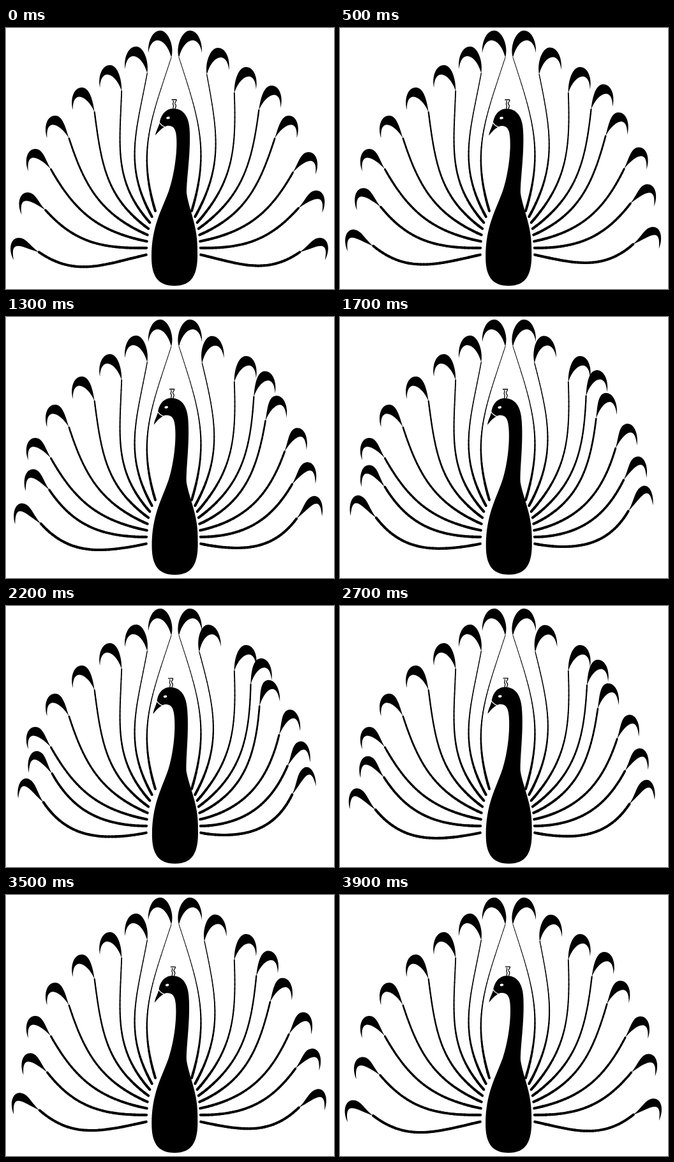
These frames come from a looping animation (514 by 408 pixels, 4 s). An HTML page with a canvas:

```html
<!DOCTYPE html>
<html lang="en">
<head>
<meta charset="utf-8">
<title>Peacock</title>
<style>
  html, body { margin: 0; width: 100%; height: 100%; overflow: hidden; background: #fff; }
  canvas { display: block; }
</style>
</head>
<body>
<canvas id="stage" width="514" height="408"></canvas>
<script>
const ctx = document.getElementById('stage').getContext('2d');
const LOOP = 4000, STEP = 100, RAD = Math.PI / 180;

// Top of each plume and its full swing in degrees; the right fan is drawn mirrored
const leftFan = [[242, 4], [204, 29], [163, 58], [119, 93], [77, 137], [46, 189], [34, 257, 9.6], [20, 328, 17]];
const rightFan = [[237, 4], [193, 31, 3.4], [149, 61], [109, 90, 4.4], [82, 137, 9.8], [51, 194, 11.7], [39, 254, 14.2], [33, 328, 24]];

const body = `M262,126 C278,126 288,138 288,165 C289,200 283,235 283,258
  C287,286 301,309 300,350 C301,385 292,403 264,403 C236,403 228,385 228,358
  C228,310 244,285 255,255 C263,232 269,195 267,170 C266,156 261,152 252,153
  C244,156 239,162 234,168 C235,160 240,154 241,146 C244,133 252,126 262,126Z`;
const crest = `M260,112 L267,112 C268,115 263,116 265,119 C268,121 266,123 265,126
  M262,114 C264,116 260,118 262,120 C264,122 261,124 262,126`;
const beakLine = 'M239,145 C241,150 244,153 250,155';

// The neck leans left, more towards the head
function lean(path, sway) {
  return new Path2D(path.replace(/(\d+),(\d+)/g, (_, x, y) => {
    const k = sway * Math.max(-0.2, (270 - y) / 130);
    return `${+x - 4.5 * k},${+y + k}`;
  }));
}

// i counts from the upright feather down to the lowest one
function feather([ax, ay, swing = 0], i, sway) {
  const root = [219 + 15 * 0.65 ** i, 286 + 8.8 * i + 0.14 * i * i];
  const reach = Math.hypot(ax - root[0], ay - root[1]);

  // Bend about the root, more towards the plume
  const bend = ([x, y]) => {
    const dx = x - root[0], dy = y - root[1];
    const a = swing * RAD * sway * (Math.hypot(dx, dy) / reach) ** 0.65;
    const c = Math.cos(a), s = Math.sin(a);
    return [root[0] + dx * c - dy * s, root[1] + dx * s + dy * c];
  };
  const near = (x, y) => [ax + x, ay + y];
  const along = ([x, y], degrees, d) => [x + d * Math.sin(degrees * RAD), y + d * Math.cos(degrees * RAD)];

  const tip = near(1.6 * i - 19, 35);
  const inner = near(17 + 0.3 * i * i, 42 - 0.4 * i * i);
  const slope = 7 * i + 0.5 * i * i - 18;
  const handle = 0.41 * Math.hypot(inner[0] - root[0], inner[1] - root[1]);
  const stem = [inner, along(inner, slope, handle), along(root, 17 + 12.3 * i, -handle), root];

  const curve = (...points) => ctx.bezierCurveTo(...points.flatMap(bend));
  ctx.beginPath();
  ctx.moveTo(...bend(tip));
  curve([tip[0] - 1 - 1.2 * i, tip[1] - 17], near(-13, 0), near(0, 0));
  curve(near(12, 0), along(inner, slope, -18), inner);
  curve(near(8, 8 + 1.2 * i), near(-15, 7 - 1.2 * i), tip);
  ctx.fill();

  const at = t => {
    const u = 1 - t, w = [u * u * u, 3 * u * u * t, 3 * u * t * t, t * t * t];
    return bend([0, 1].map(n => w.reduce((sum, k, j) => sum + k * stem[j][n], 0)));
  };
  const thin = 1 + 0.42 * i, parts = 32;
  for (let j = 0; j < parts; j++) {
    ctx.lineWidth = thin + (4.2 - thin) * (j / parts) ** 2;
    ctx.beginPath();
    ctx.moveTo(...at(j / parts));
    ctx.lineTo(...at((j + 1) / parts));
    ctx.stroke();
  }
}

function draw(time) {
  const t = Math.floor(time % LOOP / STEP) * STEP;
  const sway = (Math.min(t, 4200 - t) / 2000) ** 1.1;
  ctx.fillStyle = '#fff';
  ctx.fillRect(0, 0, 514, 408);
  ctx.fillStyle = ctx.strokeStyle = '#000';
  ctx.lineCap = 'round';
  leftFan.forEach((f, i) => feather(f, i, sway));
  ctx.save();
  ctx.translate(525, 0);
  ctx.scale(-1, 1);
  rightFan.forEach((f, i) => feather(f, i, sway));
  ctx.restore();

  ctx.fill(lean(body, sway));
  ctx.lineWidth = 1.3;
  ctx.stroke(lean(crest, sway));
  ctx.strokeStyle = ctx.fillStyle = '#fff';
  ctx.stroke(lean(beakLine, sway));
  ctx.beginPath();
  ctx.ellipse(254 - 4.5 * sway, 140.5 + sway, 2.8, 1.9, -0.2, 0, Math.PI * 2);
  ctx.fill();
}

const start = performance.now();
(function tick() {
  draw(performance.now() - start);
  requestAnimationFrame(tick);
})();
</script>
</body>
</html>
```
